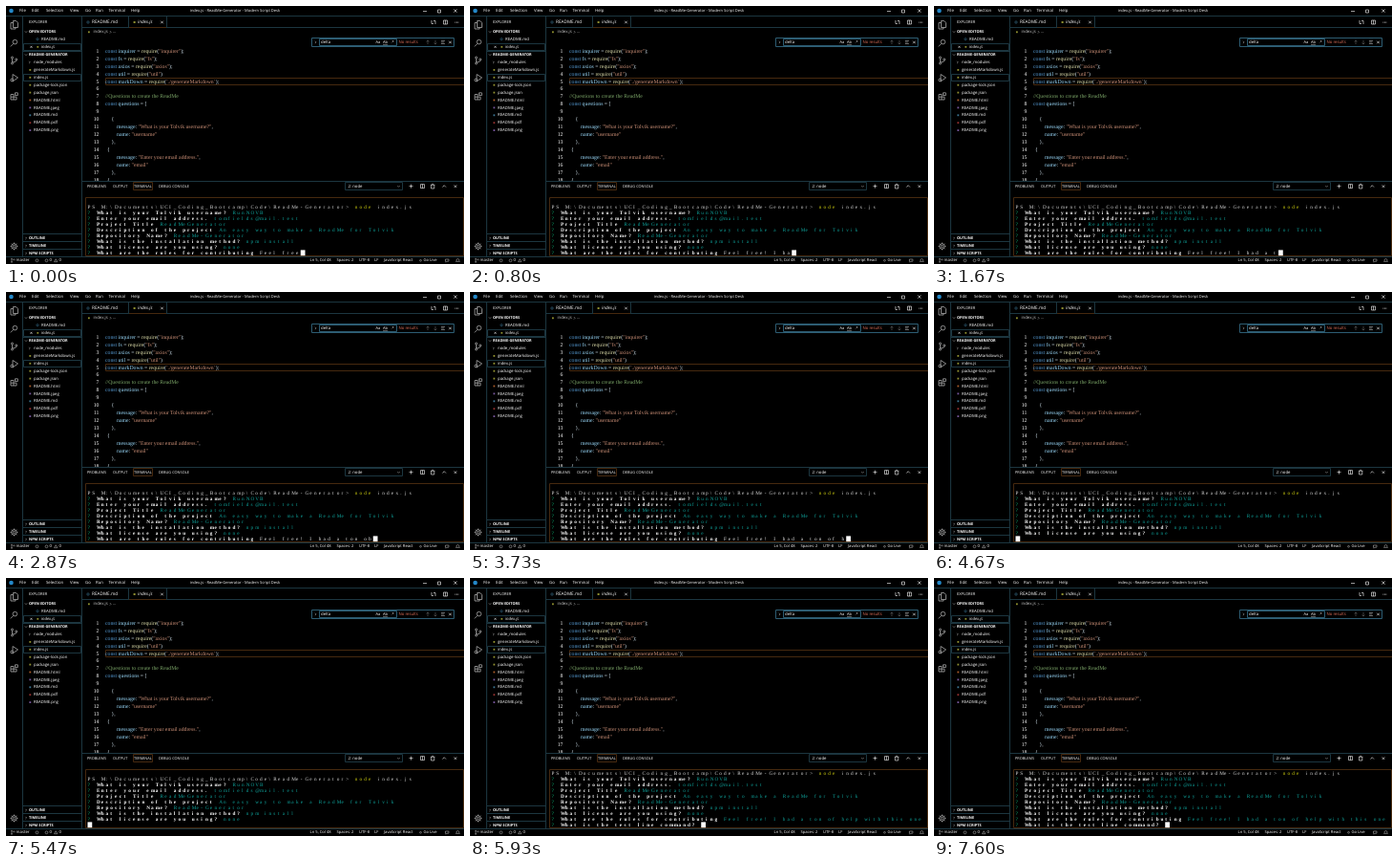
An HTML page with a canvas that plays this animation: 480 px wide and 270 px high, repeating every 8000 ms.

```html
<!DOCTYPE html>
<html lang="en">
<head>
<meta charset="utf-8">
<title>Readme generator terminal</title>
<style>
html, body { margin: 0; width: 100%; height: 100%; overflow: hidden; background: #000; }
canvas { display: block; }
</style>
</head>
<body>
<canvas id="stage" width="480" height="270"></canvas>
<script>
const ctx = document.getElementById('stage').getContext('2d');
ctx.textBaseline = 'middle';
ctx.textRendering = 'geometricPrecision';

const UI = '"Open Sans", sans-serif', SERIF = '"Liberation Serif", serif';
const WHITE = '#fff', GRAY = '#aaa', EDGE = '#1c3640', FOCUS = '#46290f', FIND = '#2d5d73',
  BLUE = '#569cd6', STRING = '#ce9178', YELLOW = '#d8d810', GREEN = '#0dbc79', TEAL = '#0fa8a0';

function text(str, x, y, { color = WHITE, size = 4.3, style = '', family = UI } = {}) {
  ctx.font = `${style} ${size}px ${family}`;
  ctx.fillStyle = color;
  ctx.fillText(str, x, y);
  return x + ctx.measureText(str).width;
}
function stroke(d, color = GRAY, width = 0.6) {
  ctx.strokeStyle = color;
  ctx.lineWidth = width;
  ctx.stroke(new Path2D(d));
}
function box(x, y, w, h, color) {
  ctx.fillStyle = color;
  ctx.fillRect(x, y, w, h);
}
const hline = (x, y, w, color = EDGE) => box(x, y, w, 1, color);
const vline = (x, y, h, color = EDGE) => box(x, y, 1, h, color);
const frame = (x, y, w, h, color = EDGE) => stroke(`M${x + .5} ${y + .5}h${w - 1}v${h - 1}h${1 - w}z`, color, 1);
const cross = (x, y, r = 1.3) => stroke(`M${x - r} ${y - r}l${2 * r} ${2 * r}m0 ${-2 * r}l${-2 * r} ${2 * r}`, WHITE);
const chevron = (x, y, open) => stroke(open ? `M${x - 1.2} ${y - .6}l1.2 1.2 1.2-1.2` : `M${x - .6} ${y - 1.2}l1.2 1.2-1.2 1.2`);
const circle = (x, y, r) => `M${x - r} ${y}a${r} ${r} 0 1 0 ${2 * r} 0a${r} ${r} 0 1 0 ${-2 * r} 0`;

function titleBar() {
  ctx.fillStyle = '#2489ca';
  ctx.fill(new Path2D(circle(5.5, 5, 2.3)));
  const menu = { File: 14, Edit: 27, Selection: 42, View: 67, Go: 83, Run: 94, Terminal: 107.5, Help: 131 };
  for (const name in menu) text(name, menu[name], 5);
  ctx.textAlign = 'center';
  text('index.js - ReadMe-Generator - Modern Script Desk', 240, 5, { size: 4.05 });
  ctx.textAlign = 'left';
  stroke('M437 5.5h4M452.5 4h3v3h-3z', WHITE);
  cross(471, 5, 1.6);
  hline(0, 10, 480);
}

function activityBar() {
  vline(17, 10, 252);
  stroke('M7.5 15.5h3l2 2v5h-5zM7.5 17.5H5v6.5h5v-1.5', GRAY, 0.8);
  stroke(circle(9.4, 37.6, 2.3) + 'M7.8 39.4l-3 3', GRAY, 0.8);
  stroke(circle(6.5, 54, 1) + circle(6.5, 60, 1) + circle(10.8, 56, 1) + 'M6.5 55v4M10.8 57q0 2-4.3 2', GRAY, 0.8);
  stroke('M7 71.5l5.5 3.5-5.5 4z' + circle(6.2, 77.5, 1.4), GRAY, 0.8);
  stroke('M5 92.5h3v5.5H5zM5 95.2h6V98H8M9.5 90.8h2.8v2.8H9.5z', GRAY, 0.8);
  stroke(circle(8.5, 251.5, 1.2) + circle(8.5, 251.5, 2.8), GRAY, 0.8);
  for (let i = 0; i < 8; i++) {
    const c = Math.cos(i * Math.PI / 4), s = Math.sin(i * Math.PI / 4);
    stroke(`M${8.5 + 2.8 * c} ${251.5 + 2.8 * s}l${c} ${s}`, GRAY, 1);
  }
}

function sideBar() {
  vline(79, 10, 252);
  text('EXPLORER', 24, 17, { size: 4 });
  const section = (name, y, open) => {
    chevron(21, y, open);
    text(name, 24, y, { size: 3.9, style: 'bold' });
  };
  section('OPEN EDITORS', 27, true);
  stroke(circle(33, 34.7, 1.1), '#3a7390');
  text('README.md', 37, 34.7);
  frame(18, 39, 61, 8);
  cross(26.5, 42.8, 1);
  box(32.4, 41.9, 1.8, 1.8, '#8f8f2f');
  text('index.js', 37, 42.8, { style: 'italic' });
  hline(18, 47, 61);
  section('README-GENERATOR', 51, true);
  const files = ['node_modules', 'generateMarkdown.js', 'index.js', 'package-lock.json', 'package.json',
    'README.html', 'README.jpeg', 'README.md', 'README.pdf', 'README.png'];
  const tints = ['', '#8f8f2f', '#8f8f2f', '#8f8f2f', '#8f8f2f', '#a85a28', '#75559a', '#3a7390', '#94302f', '#75559a'];
  files.forEach((name, i) => {
    const y = 59 + i * 7.9;
    if (i) box(24.4, y - .9, 1.8, 1.8, tints[i]);
    else chevron(24.7, y, false);
    text(name, 29, y);
  });
  frame(18, 71, 61, 8);
  ['OUTLINE', 'TIMELINE', 'NPM SCRIPTS'].forEach((name, i) => {
    hline(18, 238 + 8 * i, 61);
    section(name, 243 + 8 * i, false);
  });
}

function tabs() {
  stroke(circle(86, 17, 1.2), '#3a7390');
  text('README.md', 90, 17, { size: 4.7 });
  vline(128, 11, 11);
  vline(168, 11, 11);
  hline(79, 22, 401);
  hline(129, 22, 39, FOCUS);
  box(133.6, 16, 2, 2, '#8f8f2f');
  text('index.js', 138, 17, { size: 4.7, style: 'italic' });
  cross(163.5, 17);
  stroke('M446 15v3.5h2M450 19v-3.5h-2M458.5 15h4v4h-4zM460.5 15v4', WHITE);
  for (const x of [470.5, 472, 473.5]) box(x, 16.7, .8, .8, WHITE);
  box(86, 26.4, 1.8, 1.8, '#8f8f2f');
  text('index.js', 91.5, 27.3, { color: '#ccc' });
  chevron(109.5, 27.3, false);
  text('...', 112, 27.3, { color: '#ccc' });
}

// Colours one line of code by token kind.
function code(line, x, y) {
  const tokens = line.match(/\/\/.*|"[^"]*"|`[^`]*`|\w+|\s+|[^\w\s]/g) || [];
  for (const t of tokens) {
    let color = '#d8eaf5';
    if (t.startsWith('//')) color = '#7ca668';
    else if (/^["`]/.test(t)) color = STRING;
    else if (t === 'const') color = BLUE;
    else if (t === 'require') color = '#dcdcaa';
    else if (/^\w/.test(t)) color = '#9cdcfe';
    x = text(t, x, y, { color, size: 5.78, family: SERIF });
  }
}

function editor() {
  const lines = [
    [104, 'const inquirer = require("inquirer");'],
    [104, 'const fs = require("fs");'],
    [104, 'const axios = require("axios");'],
    [104, 'const util = require("util")'],
    [104, 'const markDown = require(`./generateMarkdown`);'],
    [104, ''],
    [104, '//Questions to create the ReadMe'],
    [104, 'const questions = ['],
    [104, ''],
    [110.5, '{'],
    [116, 'message: "What is your Tolvik username?",'],
    [116, 'name: "username"'],
    [110.5, '},'],
    [106, '{'],
    [116, 'message: "Enter your email address.",'],
    [116, 'name: "email"'],
    [110.5, '},'],
    [106, '{']
  ];
  frame(104, 75, 377, 8, FOCUS);
  lines.forEach(([x, line], i) => {
    const y = 47.3 + i * 7.93;
    ctx.textAlign = 'right';
    text(i + 1, 97.5, y, { size: 5.78, family: SERIF });
    ctx.textAlign = 'left';
    code(line, x, y);
  });
}

function findBox() {
  box(320, 33, 150, 11, '#000');
  frame(320, 33, 150, 10, FIND);
  chevron(324.5, 38, false);
  frame(328, 34, 82, 8, FIND);
  text('delta', 330, 38);
  text('Aa', 387.5, 38, { size: 4 });
  text('Ab', 395, 38, { size: 4 });
  stroke('M395 40.4h5');
  text('.*', 403.5, 38, { size: 4 });
  text('No results', 411.5, 38, { color: '#e0705a' });
  stroke('M442 40v-4m-1.4 1.4l1.4-1.4 1.4 1.4M450 36v4m-1.4-1.4l1.4 1.4 1.4-1.4', '#666');
  stroke('M456 36.5h4m-4 1.5h3m-3 1.5h4');
  cross(465.5, 38);
}

function panelHeader() {
  box(80, 183, 400, 87, '#000');
  hline(79, 183, 401);
  const names = { PROBLEMS: 85, OUTPUT: 112, TERMINAL: 134, 'DEBUG CONSOLE': 160 };
  for (const name in names) text(name, names[name], 188.5, { size: 3.9 });
  frame(133, 184, 21, 9, FOCUS);
  frame(355, 184, 61, 9);
  text('2: node', 358.5, 188.7);
  chevron(411.5, 188.7, true);
  stroke('M424.5 186.6v4m-2-2h4M434.5 186.6h4v4h-4zM436.5 186.6v4M445 187.2h4.4m-3.8 0v3.8h3.2v-3.8M446.4 186.4h1.6M457.4 189.5l1.8-1.8 1.8 1.8', WHITE);
  cross(471, 188.7);
  frame(83, 200, 397, 62, FOCUS);
}

function statusBar() {
  hline(0, 262, 480);
  stroke(circle(6, 264.7, .6) + circle(6, 267.8, .6) + circle(8.3, 265.4, .6) + 'M6 265.3v2');
  stroke(circle(32.5, 266.3, 1.4) + circle(42.5, 266.3, 1.4) + 'M50.5 267.7l1.7-3 1.7 3z');
  const items = { 'Ln 5, Col 48': 318.5, 'Spaces: 2': 346.5, 'UTF-8': 370, LF: 386, 'JavaScript React': 396, 'Go Live': 437.5 };
  for (const name in items) text(name, items[name], 266.3, { size: 4.15 });
  text('master', 10.5, 266.3);
  text('0', 45.5, 266.3);
  text('0', 55.5, 266.3);
  stroke(circle(434.5, 266.3, .9));
  stroke('M460.5 265h3.5v2.2h-2l-1 1v-1h-.5zM471.5 267.4h4l-.7-1v-1.2q-1.3-1.6-2.6 0v1.2z');
}

// Terminal: every glyph starts at the left of its cell.
const CELL = 4.75, LEFT = 85.5;
function cells(str, col, y, color, style) {
  [...str].forEach((ch, i) =>
    text(ch, LEFT + (col + i) * CELL, y, { color, style, size: 5.25, family: SERIF }));
  return col + str.length;
}
function ask(question, answer, y, color = TEAL) {
  cells('?', 0, y, GREEN);
  const col = cells(question + ' ', 2, y, WHITE, 'bold');
  return cells(answer, col, y, color);
}
const cursor = (col, y) => box(LEFT + col * CELL, y - 3, CELL, 5.8, WHITE);

const history = [
  ['What is your Tolvik username?', 'RunNOVB'],
  ['Enter your email address.', 'tomfields@mail.test'],
  ['Project Title', 'ReadMeGenerator'],
  ['Description of the project', 'An easy way to make a ReadMe for Tolvik'],
  ['Repository Name?', 'ReadMe-Generator'],
  ['What is the installation method?', 'npm install'],
  ['What license are you using?', 'none']
];
const RULES = 'What are the rules for contributing';
const ANSWER = 'Feel free! I had a ton of help with this one';
const FIXED = 3070, ENTER = 5870, NEXT = 5930, LOOP = 8000;

// Key presses: start, end, first length, last length.
const runs = [
  [0, 0, 9, 9], [70, 70, 10, 10], [270, 870, 11, 16], [1070, 1130, 17, 18], [1270, 1600, 19, 20],
  [1770, 1930, 21, 23], [2070, 2070, 24, 24], [2330, 2330, 25, 25], [FIXED, FIXED, 24, 24],
  [3330, 3430, 25, 26], [3730, 4470, 27, 34], [4600, 4600, 35, 35], [4730, 5200, 36, 44]
];
function typedLength(t) {
  const [start, end, first, last] = runs.findLast(r => r[0] <= t);
  if (start === end) return first;
  return Math.min(last, first + Math.floor((t - start) / (end - start) * (last - first) + 1e-6));
}
const within = (t, from, to) => t >= from && t < to;

function terminal(t) {
  const scrolled = t >= ENTER, top = scrolled ? 204.4 : 210.4, bottom = 258.4;
  let col = cells('PS M:\\Documents\\UCI_Coding_Bootcamp\\Code\\ReadMe-Generator> ', 0, top, '#ddd');
  col = cells('node', col, top, YELLOW);
  cells(' index.js', col, top, '#ddd');
  history.forEach(([q, a], i) => ask(q, a, top + 6 * (i + 1)));
  if (scrolled) {
    ask(RULES, ANSWER, bottom - 6);
    cursor(t < NEXT ? 0 : ask('What is the test line command?', '', bottom), bottom);
  } else if (within(t, 4670, 4730) || within(t, 5470, 5530)) {
    cursor(0, bottom);
  } else {
    let typed = ANSWER.slice(0, typedLength(t));
    if (t < FIXED) typed = typed.replace(/of$/, 'ob');
    cursor(ask(RULES, typed, bottom, '#eee'), bottom);
  }
}

function draw() {
  box(0, 0, 480, 270, '#000');
  for (const part of [titleBar, activityBar, sideBar, tabs, editor, findBox, panelHeader, statusBar]) part();
  terminal(performance.now() % LOOP);
  requestAnimationFrame(draw);
}
draw();
</script>
</body>
</html>
```
